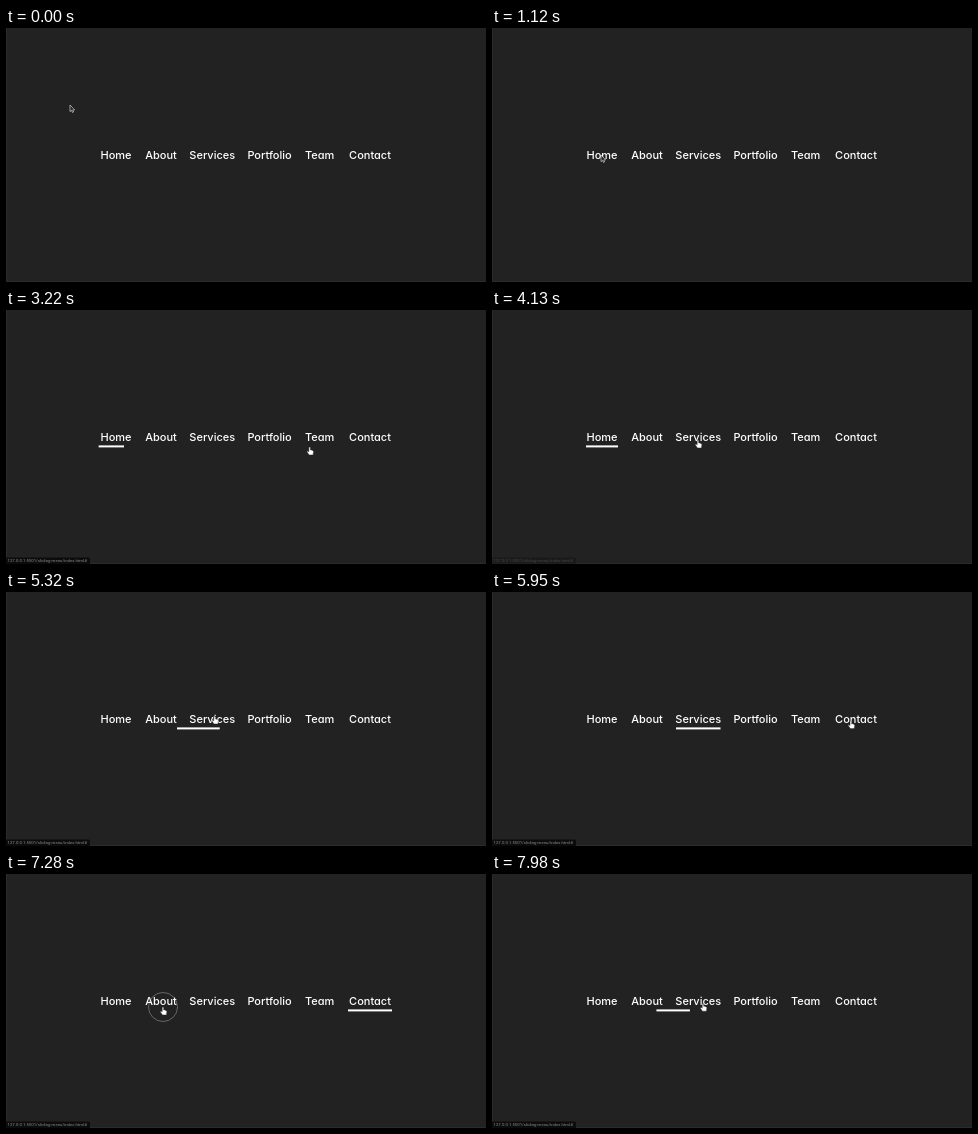
An HTML page that plays this animation: 480 by 254 pixels, repeating every 8 s.

```html
<!DOCTYPE html>
<html lang="en">
<head>
<meta charset="utf-8">
<title>Sliding menu</title>
<style>
  html, body { margin: 0; width: 100%; height: 100%; overflow: hidden; background: #222; }
  svg { display: block; width: 100vw; height: 100vh; }
  #menu text {
    font: 500 11px Inter, "Open Sans", sans-serif;
    font-feature-settings: "cv11";
    fill: #fff;
    text-anchor: middle;
  }
  #status text { font: 4.3px Roboto, "Liberation Sans", sans-serif; fill: #8c8c8c; }
</style>
</head>
<body>
<svg viewBox="0 0 480 254">
  <rect width="480" height="254" fill="#222"/>
  <path d="M.5 0V253.5H480" fill="none" stroke="#2b2b2b"/>
  <g id="menu"></g>
  <rect id="bar" y="135.4" height="2" fill="#fff"/>
  <g id="status">
    <path d="M0 247.5H82.5Q84 247.5 84 249V254H0Z" fill="#0c0c0c"/>
    <text x="1.5" y="252.2">127.0.0.1:5501/sliding-menu/index.html#</text>
  </g>
  <circle id="ring" fill="none" stroke="#fff" stroke-opacity=".3"/>
  <g id="cursor">
    <path id="arrow" d="M0 0V6.6L1.5 5.3 2.5 7.5 3.6 7 2.7 4.9H4.6Z"
          fill="#222" stroke="#ddd" stroke-width=".65" stroke-linejoin="round"/>
    <path id="hand" d="M-.8 .6Q0 -.5 .7 .6V3Q1.5 2.4 1.9 3.3 2.8 2.9 3.1 3.7 3.9 3.6 3.9 4.5L3.4 7.9H-.5L-2.6 4.9Q-2.6 3.8 -1.6 4.2L-.8 4.9Z"
          fill="#fff" stroke="#222" stroke-width=".4" stroke-linejoin="round"/>
  </g>
</svg>
<script>
const LOOP = 8000, STEP = 70, SLIDE = 1000;
const $ = id => document.getElementById(id);
const set = (el, attrs) => Object.entries(attrs).forEach(([k, v]) => el.setAttribute(k, v));
const clamp = v => Math.min(1, Math.max(0, v));
const mix = (a, b, p) => a + (b - a) * p;

const links = [
  { label: "Home", x: 94, w: 32 },
  { label: "About", x: 139, w: 32 },
  { label: "Services", x: 184, w: 44.5 },
  { label: "Portfolio", x: 241.5, w: 44 },
  { label: "Team", x: 298.3, w: 30.7 },
  { label: "Contact", x: 342, w: 44 }
];
const [home, about, services, , , contact] = links;

// Bar slides: start time and destination
const slides = [
  { at: 2730, to: home },
  { at: 4760, to: services },
  { at: 6250, to: contact },
  { at: 7395, to: about }
];

// Click rings: start, end, radius
const clicks = [[1540, 1680, 10.5], [2590, 2730, 14.5], [4620, 4760, 14.5], [6090, 6230, 14.5], [7250, 7390, 14.5]];

// Pointer path: time, x, y
const path = [
  [0, 64, 77], [210, 53, 102], [490, 374, 152], [840, 106, 136], [1120, 109, 127],
  [2100, 109, 127], [2590, 110, 126], [2730, 110, 126], [3430, 357, 140], [3570, 350, 140],
  [4130, 206, 130], [4270, 206, 123], [4760, 206, 123], [5320, 208.5, 124], [5530, 254, 124],
  [6020, 365, 129], [6230, 365, 129], [6510, 346, 130], [6860, 330, 130], [7230, 157, 133],
  [7400, 157, 133], [7840, 159, 127], [7980, 211, 129.3], [8000, 211, 129.3]
];

for (const { label, x, w } of links) {
  const text = document.createElementNS("http://www.w3.org/2000/svg", "text");
  set(text, { x: x + w / 2, y: 130.5 });
  text.textContent = label;
  $("menu").append(text);
}

// CSS "ease": cubic-bezier(.25, .1, .25, 1)
function ease(p) {
  const bezier = (a, b, s) => 3 * a * s * (1 - s) ** 2 + 3 * b * s * s * (1 - s) + s ** 3;
  let lo = 0, hi = 1;
  for (let i = 0; i < 24; i++) {
    const mid = (lo + hi) / 2;
    if (bezier(.25, .25, mid) < p) lo = mid; else hi = mid;
  }
  return bezier(.1, 1, lo);
}

function barAt(t) {
  let x = 87.5, w = 0;
  for (const { at, to } of slides) {
    if (t < at) break;
    const p = ease(clamp((t - at) / SLIDE));
    x = mix(x, to.x, p);
    w = mix(w, to.w, p);
  }
  return { x, w };
}

function pointerAt(t) {
  const i = path.findIndex(([time]) => time > t);
  const [t0, x0, y0] = path[i - 1], [t1, x1, y1] = path[i];
  let p = (t - t0) / (t1 - t0);
  if (t1 - t0 > 300) p = p * p * (3 - 2 * p);
  return { x: mix(x0, x1, p), y: mix(y0, y1, p) };
}

function render(t) {
  const bar = barAt(t);
  set($("bar"), { x: bar.x, width: bar.w });

  const { x, y } = pointerAt(t);
  const onLink = t >= 1260 && y > 115 && y < 139 && links.some(l => x >= l.x && x <= l.x + l.w);
  set($("cursor"), { transform: `translate(${x} ${y})` });
  set($("arrow"), { visibility: onLink ? "hidden" : "visible" });
  set($("hand"), { visibility: onLink ? "visible" : "hidden" });

  const click = clicks.find(([from, to]) => t >= from && t < to);
  set($("ring"), { cx: x, cy: y, r: click ? click[2] : 0 });

  const shown = t < 3800
    ? clamp((t - 2800) / 200) * clamp((3700 - t) / 200)
    : clamp((t - 4060) / 200);
  set($("status"), { opacity: shown });
}

function tick() {
  const t = performance.now() % LOOP;
  render(Math.floor(t / STEP) * STEP);
  requestAnimationFrame(tick);
}
tick();
</script>
</body>
</html>
```
